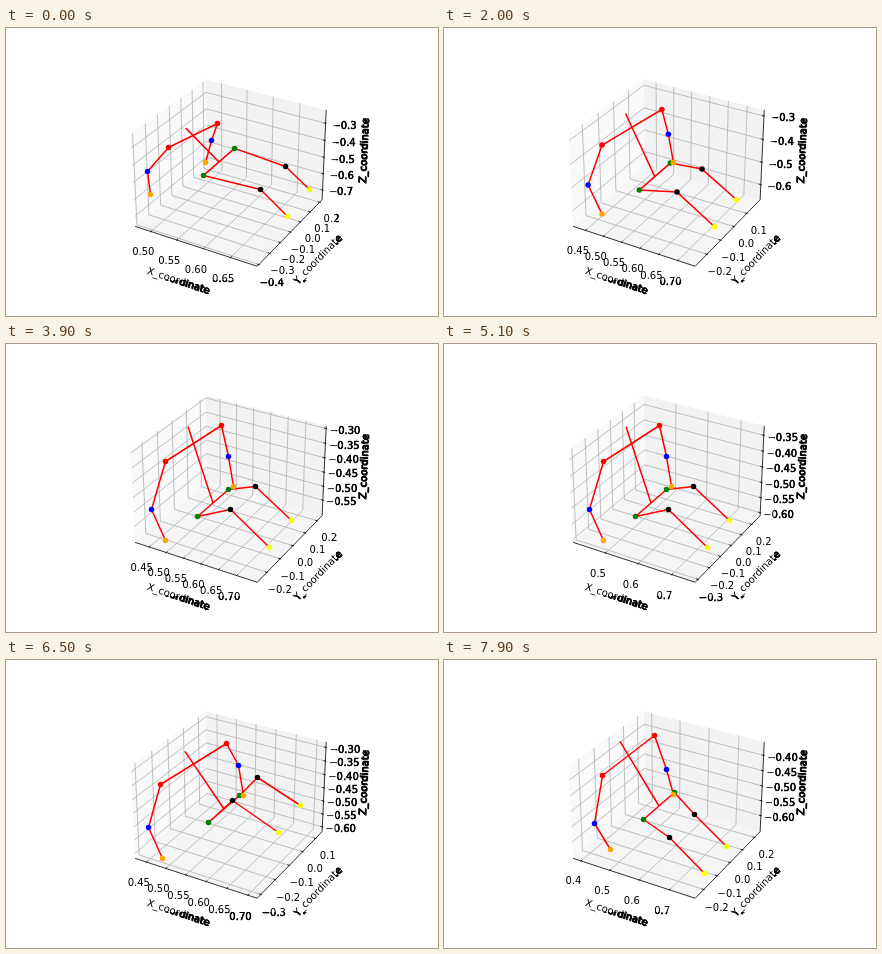
An HTML page that plays this animation: 432 by 288 pixels, repeating every 8000 ms.

```html
<!DOCTYPE html>
<html lang="en">
<head>
<meta charset="utf-8">
<title>Walking skeleton in a 3D plot</title>
<style>
  html, body { margin: 0; width: 100%; height: 100%; overflow: hidden; background: #fff; }
  svg { display: block; width: 432px; height: 288px; }
  text { font: 10px "DejaVu Sans", sans-serif; text-anchor: middle; }
  #grid path { fill: none; stroke: #b0b0b0; stroke-width: .8; }
  #axes path, #ticks path { fill: none; stroke: #000; stroke-width: .8; }
  #bones path { fill: none; stroke: #f00; stroke-width: 1.5; stroke-linejoin: round; }
</style>
</head>
<body>
<svg viewBox="0 0 432 288">
  <defs>
    <clipPath id="margin">
      <path clip-rule="evenodd" d="M0 0H432V288H0ZM113 35H330V252H113Z"/>
    </clipPath>
  </defs>
  <g id="panes"></g>
  <g id="grid"></g>
  <g id="axes"></g>
  <g id="ticks"></g>
  <g transform="translate(.5 .5)">
    <g id="bones"></g>
    <g id="joints"></g>
  </g>
  <g id="words">
    <g id="labels"></g>
    <g id="titles"></g>
  </g>
  <!-- text outside the plot square is overprinted and looks heavier -->
  <g clip-path="url(#margin)">
    <use href="#words" stroke="#000" stroke-width=".45"/>
    <use href="#titles" x=".6" y=".6" stroke="#000" stroke-width=".4"/>
  </g>
</svg>
<script>
const LOOP = 8000, STEP = 100, SPREAD = 1350;

// resting axes as [start, length]
const scales = { x: [.408, .348], y: [-.269, .51], z: [-.606, .316] };

// resting joints on the stage, and the parts whose moves they follow
const joint = (x, y, color, ...parts) => ({ home: [x, y], color, parts });
const joints = {
  shoulderA: joint(159, 117, 'red', 'shoulderA'),
  shoulderB: joint(215, 81, 'red', 'shoulderB'),
  elbowA: joint(145, 165, 'blue', 'armA'),
  elbowB: joint(222, 112, 'blue', 'armB'),
  hipA: joint(191, 172, 'green', 'hips'),
  hipB: joint(222, 145, 'green', 'hips'),
  kneeA: joint(224, 165, 'black', 'knees'),
  kneeB: joint(249, 142, 'black', 'knees'),
  ankleA: joint(263, 203, 'yellow', 'ankles'),
  ankleB: joint(285, 176, 'yellow', 'ankles'),
  handA: joint(159, 196, 'orange', 'armA', 'hands'),
  handB: joint(227, 142, 'orange', 'armB', 'hands')
};
const chains = [
  ['handA', 'elbowA', 'shoulderA', 'shoulderB', 'elbowB', 'handB'],
  ['ankleA', 'kneeA', 'hipA', 'hipB', 'kneeB', 'ankleB']
];

// each gesture swells to its peak time and fades, shifting parts and axes
const gestures = [
  { peak: 0,
    shoulderA: [3, 2], shoulderB: [-4, 14], armA: [-4, -22], armB: [-17, 0], hands: [-11, -8],
    hips: [6, -25], knees: [30, -4], ankles: [18, -15],
    x: [.061, -.119], y: [-.146, .132], z: [-.153, .22] },
  { peak: 1300,
    shoulderA: [-3, -1], shoulderB: [5, 0], armA: [-3, -18], armB: [4, -13], hands: [0, -4],
    hips: [8, -22], knees: [18, -3], ankles: [15, -10],
    x: [.015, -.039], y: [-.028, -.04], z: [-.133, .167] },
  { peak: 5100, x: [-.01, .022], y: [-.055, .1], z: [-.004, -.027] },
  { peak: 6500,
    shoulderA: [-5, 7], shoulderB: [5, 2], armA: [-3, 2], armB: [10, -7],
    hips: [11, -10], knees: [2, -25], ankles: [9, -31],
    x: [.013, -.047], y: [-.056, -.033], z: [-.013, .023] },
  { peak: 7900,
    shoulderA: [-1, -2], shoulderB: [-5, -6], armA: [5, -2], armB: [0, -3], hands: [2, -5],
    hips: [8, -13], knees: [1, 12], ankles: [-3, 10],
    x: [-.036, .063], y: [.007, 0], z: [-.049, -.018] }
];

const layer = id => document.getElementById(id);

function swell(t, peak) {
  const f = Math.max(0, 1 - Math.abs(t - peak) / SPREAD);
  return f * f * (3 - 2 * f);
}

function moved(home, parts, t) {
  return home.map((v, i) => gestures.reduce((sum, g) =>
    sum + swell(t, g.peak) * parts.reduce((d, part) => d + (g[part] ? g[part][i] : 0), 0), v));
}

// perspective view of the 4:4:3 box; arguments are fractions of each side
function project([x, y, z]) {
  x -= .5; y -= .5; z = (z - .5) * .75;
  const k = 139.92 / (1 - (.433 * x - .75 * y + .5 * z) / 8.4);
  return [224.34 + k * (.866 * x + .5 * y), 140.34 - k * (-.25 * x + .433 * y + .866 * z)];
}

const pathTo = points => 'M' + points.map(p => p.map(v => v.toFixed(2)).join(' ')).join('L');
const line = (...corners) => `<path d="${pathTo(corners.map(project))}"/>`;
const pane = (color, ...corners) => `<path fill="${color}" d="${pathTo(corners.map(project))}Z"/>`;

// grid corners, tick ends and text anchor (out = distance from the box) of each axis
const layout = {
  x: { grid: s => [[s, 0, 0], [s, 1, 0], [s, 1, 1]],
       tick: s => [[s, .016, 0], [s, -.008, 0]], text: (s, out) => [s, -out, -out] },
  y: { grid: s => [[1, s, 0], [0, s, 0], [0, s, 1]],
       tick: s => [[.984, s, 0], [1.008, s, 0]], text: (s, out) => [1 + out, s, -out] },
  z: { grid: s => [[1, 1, s], [0, 1, s], [0, 0, s]],
       tick: s => [[.984, 1, s], [1.008, 1, s]], text: (s, out) => [1 + out, 1 + out, s] }
};

function drawScales(t) {
  let grid = '', ticks = '', labels = '';
  for (const name in layout) {
    const { grid: corners, tick, text } = layout[name];
    const [start, size] = moved(scales[name], [name], t);
    const wide = size > .36, gap = wide ? .1 : .05;
    for (let n = Math.ceil(start / gap); n * gap < start + size; n++) {
      const s = (n * gap - start) / size;
      if (s < .02 || s > .98) continue;
      const [x, y] = project(text(s, .1015));
      const value = (n < 0 ? '\u2212' : '') + Math.abs(n * gap).toFixed(wide ? 1 : 2);
      grid += line(...corners(s));
      ticks += line(...tick(s));
      labels += `<text x="${x.toFixed(2)}" y="${Math.round(y + 7.8)}">${value}</text>`;
    }
  }
  layer('grid').innerHTML = grid;
  layer('ticks').innerHTML = ticks;
  layer('labels').innerHTML = labels;
}

function drawTitles() {
  layer('titles').innerHTML = Object.keys(layout).map(name => {
    const { text } = layout[name];
    const [a, b] = [text(0, 0), text(1, 0)].map(project);
    const angle = Math.atan2(b[1] - a[1], b[0] - a[0]) * 180 / Math.PI;
    const spot = project(text(.5, .2207));
    return `<text transform="translate(${spot}) rotate(${angle})" y="2.7">${name.toUpperCase()}_coordinate</text>`;
  }).join('');
}

const middle = (a, b) => a.map((v, i) => (v + b[i]) / 2);

function drawBody(t) {
  const at = {};
  for (const name in joints) at[name] = moved(joints[name].home, joints[name].parts, t);
  const pelvis = middle(at.hipA, at.hipB), chest = middle(at.shoulderA, at.shoulderB);
  const head = chest.map((v, i) => v + .28 * (v - pelvis[i]));
  layer('bones').innerHTML = [...chains.map(c => c.map(name => at[name])), [pelvis, head]]
    .map(points => `<path d="${pathTo(points)}"/>`).join('');
  layer('joints').innerHTML = Object.keys(joints).map(name =>
    `<circle cx="${at[name][0]}" cy="${at[name][1]}" r="2.75" fill="${joints[name].color}"/>`).join('');
}

layer('panes').innerHTML =
  pane('#f9f9f9', [0, 0, 0], [0, 1, 0], [0, 1, 1], [0, 0, 1]) +
  pane('#f2f2f2', [0, 1, 0], [1, 1, 0], [1, 1, 1], [0, 1, 1]) +
  pane('#f5f5f5', [0, 0, 0], [1, 0, 0], [1, 1, 0], [0, 1, 0]);
layer('axes').innerHTML = line([0, 0, 0], [1, 0, 0], [1, 1, 0], [1, 1, 1]);
drawTitles();

const begin = performance.now();
let shown = -1;
function play() {
  const t = Math.floor((performance.now() - begin) % LOOP / STEP) * STEP;
  if (t !== shown) {
    shown = t;
    drawScales(t);
    drawBody(t);
  }
  requestAnimationFrame(play);
}
play();
</script>
</body>
</html>
```
